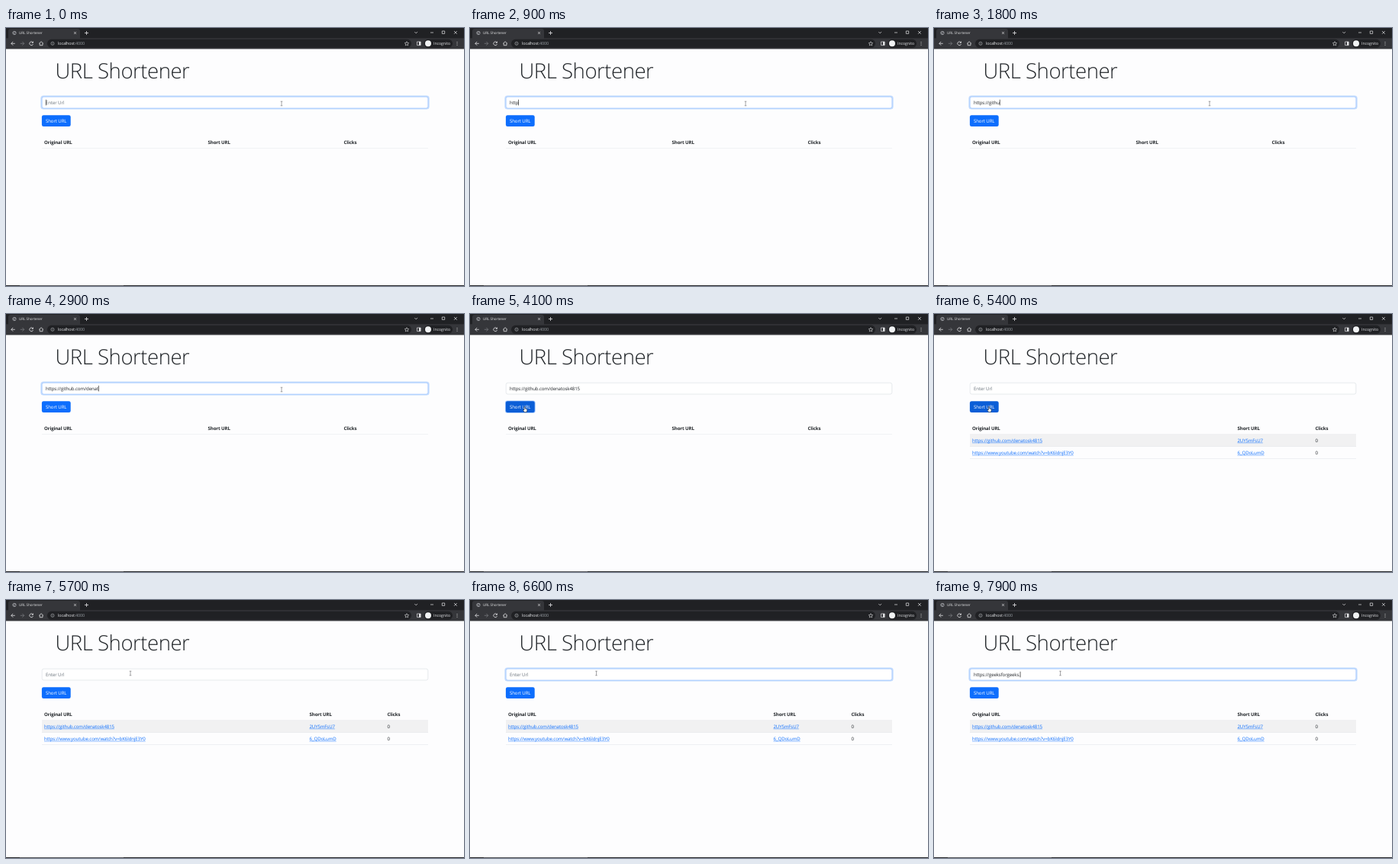
Write an HTML page with a canvas that moves like this. It is 600 px wide and 338 px high and loops after 8000 ms.

```html
<!DOCTYPE html>
<html lang="en">
<head>
<meta charset="utf-8">
<title>URL Shortener</title>
<style>
  html, body { margin: 0; width: 100%; height: 100%; overflow: hidden; background: #fdfdfe; }
  canvas { display: block; width: 600px; height: 338px; }
</style>
</head>
<body>
<canvas id="stage"></canvas>
<script>
const LOOP = 8000;
const FONT = '"Open Sans", "Noto Sans", sans-serif';
const INK = '#212529', BLUE = '#0d6efd', LINE = '#dee2e6';
const canvas = document.getElementById('stage');
const ratio = window.devicePixelRatio || 1;
canvas.width = 600 * ratio;
canvas.height = 338 * ratio;
const ctx = canvas.getContext('2d');
ctx.scale(ratio, ratio);
ctx.textRendering = 'geometricPrecision';

const FIRST = 'https://github.com/denatosk4815';
const SECOND = 'https://www.youtube.com/watch?v=bK6ldnjE3Y0';
const THIRD = 'https://geeksforgeeks.';

// [time, letters typed]
const TYPING_FIRST = [[0, 0], [300, 0], [400, 1], [500, 1], [1300, 8], [1400, 8], [1800, 13],
  [2300, 19], [2900, 24], [3200, 27], [3600, 31]];
const TYPING_THIRD = [[6700, 0], [6800, 1], [7600, 19], [7700, 19], [7900, 22]];
// [time, x, y]
const MOUSE = [[0, 361, 99], [3500, 361, 99], [3800, 165, 138], [4000, 72, 123], [4250, 72, 123],
  [4500, 173, 96], [4950, 173, 96], [5150, 72, 123], [5400, 72, 123], [5650, 163, 96],
  [6000, 163, 96], [6200, 165.5, 96]];
const FOCUS = [[0, 4000], [4500, 5300], [6000, LOOP]];
const ROWS = [
  { from: 4200, link: FIRST, code: '2UYSmFsU7' },
  { from: 5400, link: SECOND, code: '6_QDoLumD' }
];
const COLUMNS = [[264.5, 442.5], [360, 484], [397.5, 499.5]];

function sample(keys, t) {
  const next = keys.findIndex(k => k[0] > t);
  if (next < 0) return keys[keys.length - 1].slice(1);
  if (next === 0) return keys[0].slice(1);
  const a = keys[next - 1], b = keys[next];
  const p = (t - a[0]) / (b[0] - a[0]);
  return a.slice(1).map((v, i) => v + (b[i + 1] - v) * p);
}

function typed(text, keys, t) {
  return text.slice(0, Math.floor(sample(keys, t)[0] + 1e-6));
}

function inputValue(t) {
  if (t < 4200) return typed(FIRST, TYPING_FIRST, t);
  if (t < 4700) return '';
  if (t < 5400) return SECOND;
  return typed(THIRD, TYPING_THIRD, t);
}

function rect(x, y, w, h, color) {
  ctx.fillStyle = color;
  ctx.fillRect(x, y, w, h);
}

function pill(x, y, w, h, r, fill, stroke, width) {
  ctx.beginPath();
  ctx.roundRect(x, y, w, h, r);
  if (fill) { ctx.fillStyle = fill; ctx.fill(); }
  if (stroke) { ctx.strokeStyle = stroke; ctx.lineWidth = width; ctx.stroke(); }
}

function path(d, stroke, width = 0.7, fill) {
  const p = new Path2D(d);
  if (fill) { ctx.fillStyle = fill; ctx.fill(p); }
  if (stroke) { ctx.strokeStyle = stroke; ctx.lineWidth = width; ctx.stroke(p); }
}

function circle(x, y, r, fill, stroke, width = 0.6) {
  ctx.beginPath();
  ctx.arc(x, y, r, 0, Math.PI * 2);
  if (fill) { ctx.fillStyle = fill; ctx.fill(); }
  if (stroke) { ctx.strokeStyle = stroke; ctx.lineWidth = width; ctx.stroke(); }
}

function text(str, x, y, { size = 6.1, weight = 400, color = INK, spacing = -0.11 } = {}) {
  ctx.font = `${weight} ${size}px ${FONT}`;
  ctx.letterSpacing = spacing + 'px';
  ctx.fillStyle = color;
  ctx.fillText(str, x, y);
  return ctx.measureText(str).width;
}

function drawBrowser() {
  const light = '#e2e3e5', dim = '#77797d';
  rect(0, 0, 600, 14, '#202124');
  rect(0, 13.3, 600, 14.2, '#35363a');
  pill(3, 1, 94, 14, [3, 3, 0, 0], '#35363a');
  circle(11, 6.5, 2.2, null, '#c4c7cb');
  path('M8.9 6 L11 7 L11.4 8.6 M10.3 4.4 L11.6 5.7 L13 5.5', '#c4c7cb', 0.6);
  text('URL Shortener', 17, 8.2, { size: 4.6, color: light, spacing: -0.04 });
  path('M89 5 l3 3 m0 -3 l-3 3', light);
  path('M103 6.5 h5 m-2.5 -2.5 v5', light, 0.8);
  path('M535.3 5 l1.9 1.9 l1.9 -1.9', light);
  path('M556 6 h4', light);
  path('M571.3 4 h3.4 v3.4 h-3.4 z', light);
  path('M587 4 l3.8 3.8 m0 -3.8 l-3.8 3.8', light);

  pill(54, 14.8, 477, 11, 5.5, '#202124');
  path('M11.8 20.3 h-5 m2.4 -2.4 l-2.4 2.4 l2.4 2.4', light, 0.8);
  path('M18.8 20.3 h5 m-2.4 -2.4 l2.4 2.4 l-2.4 2.4', dim, 0.8);
  path('M35 18.7 A2.4 2.4 0 1 0 35.5 21 M35.5 17.6 v1.8 h-1.8', light, 0.8);
  path('M43.3 20.3 l2.8 -2.5 l2.8 2.5 m-4.7 -.6 v3 h3.8 v-3', light, 0.8);
  circle(61, 20.3, 2.1, null, '#b4b7bb');
  path('M61 20 v1.4 M61 18.9 v.5', '#b4b7bb', 0.6);
  const host = text('localhost', 68, 22.2, { size: 5.4, color: '#e8eaed', spacing: -0.1 });
  text(':4000', 68 + host, 22.2, { size: 5.4, color: '#9aa0a6', spacing: -0.1 });

  path('M525 17.7 l.8 1.8 l1.9 .2 l-1.4 1.3 l.4 1.9 l-1.7 -1 l-1.7 1 l.4 -1.9 l-1.4 -1.3 l1.9 -.2 z', light, 0.6);
  path('M538.5 18 h4.6 v4.6 h-4.6 z', light);
  rect(541, 18, 2.2, 4.6, light);
  pill(547.5, 14.8, 37.5, 11, 5.5, '#202124');
  circle(553, 20.3, 4, '#f1f3f4');
  text('Incognito', 560, 22.1, { size: 5.1, color: '#e8eaed', spacing: 0 });
  [18.4, 20.3, 22.2].forEach(y => circle(591, y, 0.5, light));
}

function drawInput(t, value) {
  const focused = FOCUS.some(([a, b]) => t >= a && t < b);
  if (focused) pill(45.4, 88.6, 509.2, 18, 3.6, '#c2dbfe');
  pill(47.2, 90.2, 505.6, 14.8, 2.3, '#fff', focused ? '#86b7fe' : '#ced4da', 0.5);
  const width = value ? text(value, 52, 99.9) : 0;
  if (!value) text('Enter Url', 52, 99.9, { color: '#6c757d' });
  const idle = t >= 6000 && t < 6700;
  if (focused && (!idle || (t - 6000) % 1000 < 500)) rect(52 + width, 93.8, 0.6, 7.6, '#000');
}

function drawButton(hover, pressed) {
  if (pressed) pill(46, 113.4, 39.6, 16.4, 3, '#98c1fe');
  pill(46.9, 114.2, 37.8, 14.8, 2.3, hover ? '#0b5ed7' : BLUE);
  text('Short URL', 52, 124, { color: '#fff' });
}

function drawLink(label, x, y) {
  const width = text(label, x, y, { color: BLUE });
  rect(x, y + 0.8, width, 0.45, BLUE);
}

function drawTable(t) {
  const rows = ROWS.filter(r => t >= r.from);
  const [codeX, clicksX] = COLUMNS[rows.length];
  const bold = { weight: 700 };
  text('Original URL', 50, 151.7, bold);
  text('Short URL', codeX, 151.7, bold);
  text('Clicks', clicksX, 151.7, bold);
  rect(47, 157, 506, 0.4, LINE);
  rows.forEach((row, i) => {
    const top = 157.4 + i * 16.1, base = top + 10.5;
    if (i % 2 === 0) rect(47, top, 506, 16.1, '#f1f1f2');
    rect(47, top + 15.8, 506, 0.5, LINE);
    drawLink(row.link, 50, base);
    drawLink(row.code, codeX, base);
    text('0', clicksX, base);
  });
}

function drawPointer(x, y, kind) {
  ctx.save();
  ctx.translate(x, y);
  if (kind === 'hand') {
    path('M-1 2 V-1.4 Q-.4 -2.1 .2 -1.4 V1 L2.4 1.6 Q3 1.9 2.8 3 L2.2 5.6 H-.8 L-2.5 3 Q-2.5 2.2 -1 2.8 Z', '#111', 0.5, '#fff');
  } else if (kind === 'beam') {
    path('M-1.3 -2.8 H1.3 M0 -2.8 V2.8 M-1.3 2.8 H1.3', '#6a6a6d', 0.6);
  } else {
    path('M0 0 V6 L1.4 4.8 L2.4 7 L3.3 6.6 L2.3 4.5 H4.2 Z', '#111', 0.4, '#fff');
  }
  ctx.restore();
}

function draw(t) {
  const [x, y] = sample(MOUSE, t);
  const overButton = x > 47 && x < 85 && y > 114 && y < 129;
  const overInput = x > 47 && x < 553 && y > 90 && y < 105;
  const pressed = (t >= 4000 && t < 4200) || (t >= 5300 && t < 5400);
  rect(0, 0, 600, 338, '#fdfdfe');
  drawBrowser();
  text('URL Shortener', 64.5, 66, { size: 27.5, weight: 300, spacing: -0.45 });
  drawInput(t, inputValue(t));
  drawButton(overButton, pressed);
  drawTable(t);
  drawPointer(x, y, overButton ? 'hand' : overInput ? 'beam' : 'arrow');
  rect(0, 337, 600, 1, '#26272a');
  rect(18, 337, 136, 1, '#55565a');
}

const start = performance.now();
function tick() {
  draw(Math.max(0, performance.now() - start) % LOOP);
  requestAnimationFrame(tick);
}
tick();
</script>
</body>
</html>
```
